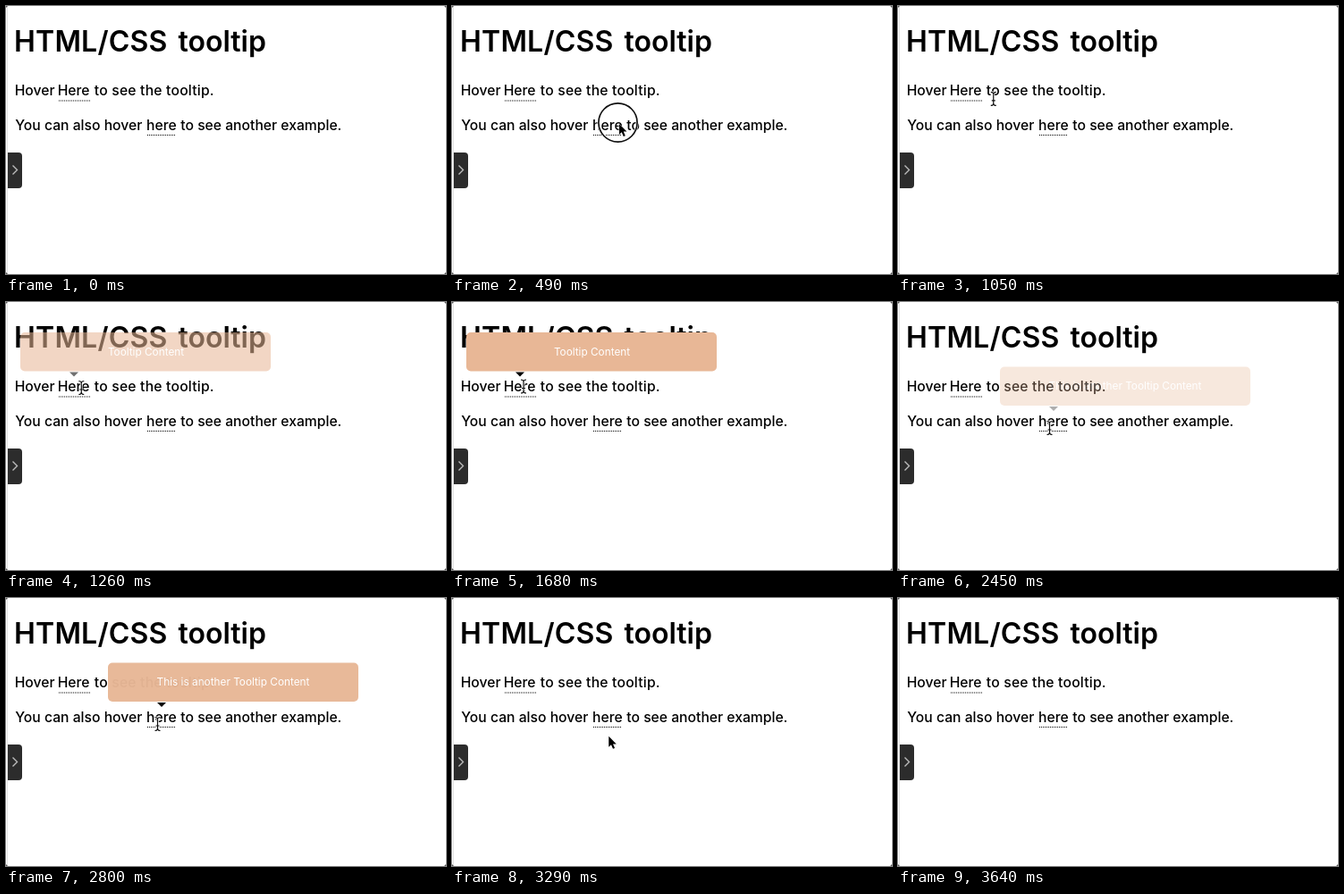
Recreate the animation shown at these times as an HTML page. Size 492 px wide and 300 px high, loop 3.71 s.

```html
<!DOCTYPE html>
<html lang="en">
<head>
<meta charset="utf-8">
<title>HTML/CSS tooltip</title>
<style>
  html, body { margin: 0; width: 100%; height: 100%; overflow: hidden; background: #fff; }
  svg { display: block; width: 492px; height: 300px; font-family: Inter, "Open Sans", sans-serif; }
  .title { font-size: 32px; font-weight: 600; }
  .body { font-size: 15.7px; font-weight: 450; }
  .wide { letter-spacing: .2px; }
  .tip text { font-size: 11.8px; fill: #fff; text-anchor: middle; }
  .dots { stroke: #000; stroke-dasharray: 1 1; }
</style>
</head>
<body>
<svg viewBox="0 0 492 300">
  <defs>
    <path id="beamShape" d="M-3-7.5q3 0 3 2.5V5q0 2.5-3 2.5M3-7.5q-3 0-3 2.5M0 5q0 2.5 3 2.5M-2 2H2" fill="none"/>
    <g id="tipBox">
      <rect width="280" height="43.5" rx="5" fill="#e8b796"/>
      <path d="M55 44.5h10l-5 5z"/>
    </g>
  </defs>
  <path d="M1.5 0V300" stroke="#e2e2e2"/>
  <path d="M0 0h2l-2 2zM492 0h-2l2 2zM0 300h2l-2-2zM492 300h-2l2-2z" fill="#555"/>

  <g class="title">
    <text class="wide" x="9" y="51">HTML/CSS</text>
    <text x="192.5" y="51">tooltip</text>
  </g>
  <g class="body">
    <text x="9.7" y="100">Hover</text>
    <text x="57.7" y="100">Here</text>
    <text class="wide" x="98.8" y="100">to see the tooltip.</text>
    <text x="10.3" y="138.5">You can also hover</text>
    <text x="157" y="138.5">here</text>
    <text x="195.3" y="138.5">to see another example.</text>
  </g>
  <path class="dots" d="M59 106H94M158 144.5H190"/>

  <path d="M2 164H14a4 4 0 0 1 4 4V200a4 4 0 0 1-4 4H2z" fill="#2c2c2c"/>
  <path d="M7.5 178.5l5 5-5 5" fill="none" stroke="#bbb" stroke-width="1.4"/>

  <g class="tip" id="tipA" transform="translate(16 34)">
    <use href="#tipBox"/>
    <text x="140.5" y="25.7">Tooltip Content</text>
  </g>
  <g class="tip" id="tipB" transform="translate(114 72.5)">
    <use href="#tipBox"/>
    <text x="140" y="25.7">This is another Tooltip Content</text>
  </g>

  <g id="ring" fill="none">
    <circle cx="185.5" cy="130.5" r="21.6" stroke="#fff" stroke-width="3"/>
    <circle cx="185.5" cy="130.5" r="21.6" stroke="#111" stroke-width="1.7"/>
  </g>
  <g id="cursor">
    <path id="arrow" transform="scale(.85)" d="M0 0V14l3.2-3 2.4 5.5 2.4-1-2.4-5.4H10z" stroke="#fff" paint-order="stroke"/>
    <g id="beam">
      <use href="#beamShape" stroke="#fff" stroke-width="2.6"/>
      <use href="#beamShape" stroke="#111" stroke-width="1.2"/>
    </g>
  </g>
</svg>
<script>
const LOOP = 3710, STEP = 70;
const $ = id => document.getElementById(id);
const show = (id, on) => $(id).setAttribute("visibility", on ? "visible" : "hidden");
const within = (t, from, to) => t >= from && t < to;
const progress = (t, from, to) => Math.min(1, Math.max(0, (t - from) / (to - from)));
const easeOut = k => 1 - (1 - k) ** 2;
const easeIn = k => k ** 2;

// The pointer enters in an arc, visits both words and leaves at the bottom
const entry = [8, 281], link = [187, 132], wordA = [80, 94.5], wordB = [169.5, 141], exit = [240, 310];
const middle = (a, b) => a.map((v, i) => (v + b[i]) / 2);
const moves = [
  { start: 70, end: 350, from: entry, via: [325, 10], to: link, ease: easeOut },
  { start: 700, end: 1400, from: link, via: middle(link, wordA), to: wordA, ease: easeOut },
  { start: 1960, end: 2380, from: wordA, via: [126, 111], to: wordB, ease: easeOut },
  { start: 3150, end: 3640, from: wordB, via: middle(wordB, exit), to: exit, ease: easeIn }
];

function pointAt(t) {
  const { start, end, from, via, to, ease } = moves.findLast(m => t >= m.start) || moves[0];
  const k = ease(progress(t, start, end)), r = 1 - k;
  return from.map((v, i) => r * r * v + 2 * r * k * via[i] + k * k * to[i]);
}

// The fade ends hard when the pointer leaves the word
function fade(id, t, start, end, max) {
  show(id, within(t, start, end));
  $(id).setAttribute("opacity", max * easeOut(progress(t, start, start + 450)));
}

function draw(now) {
  const t = Math.floor(now % LOOP / STEP) * STEP;
  fade("tipA", t, 1110, 2030, 1);
  fade("tipB", t, 2370, 3220, .97);
  show("ring", within(t, 490, 630));

  const visible = within(t, 70, 3640);
  const text = within(t, 1050, 2030) || within(t, 2240, 3220);
  show("arrow", visible && !text);
  show("beam", visible && text);
  $("cursor").setAttribute("transform", `translate(${pointAt(t)})`);
}

const begin = performance.now();
function tick() {
  draw(performance.now() - begin);
  requestAnimationFrame(tick);
}
tick();
</script>
</body>
</html>
```
